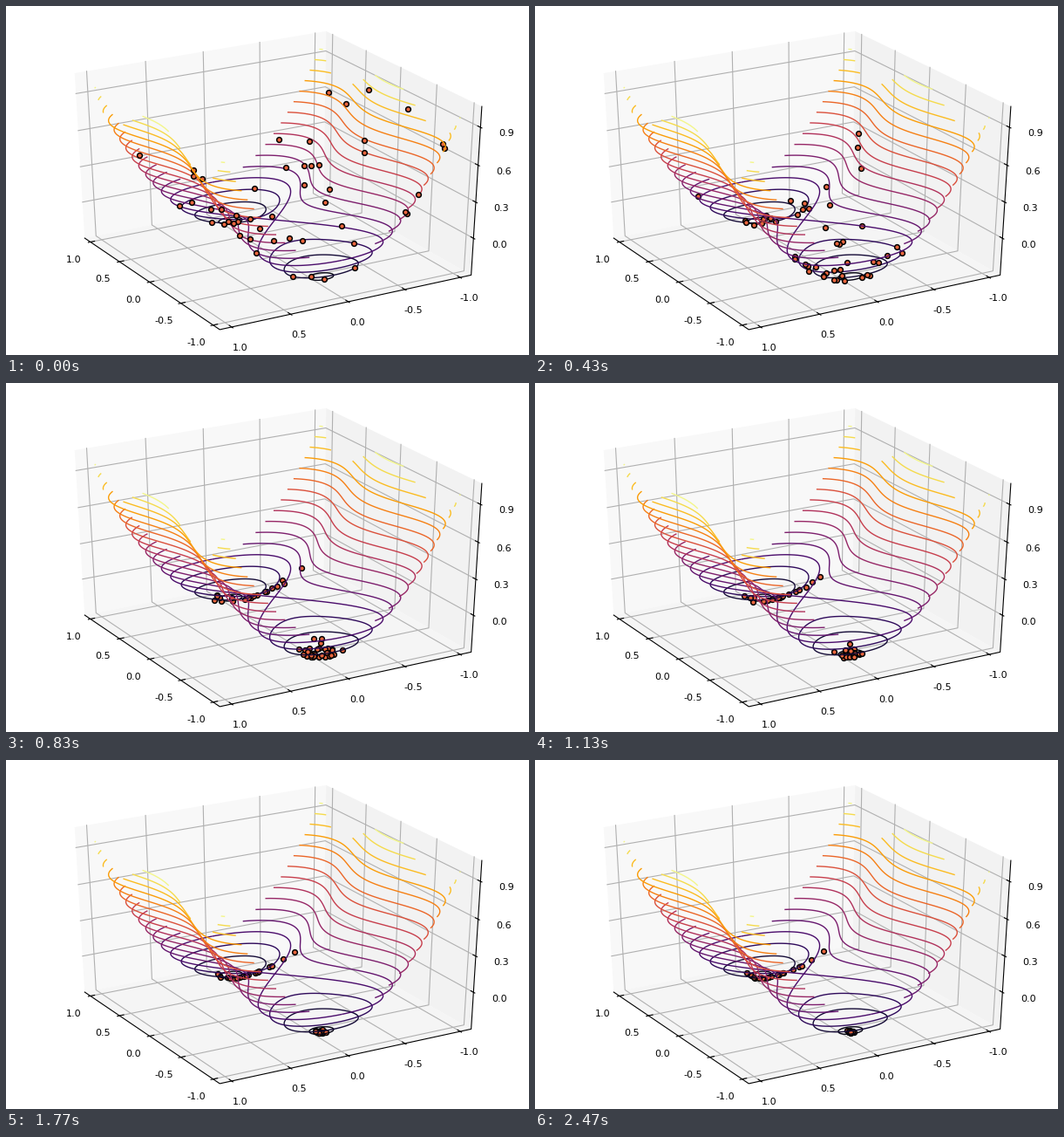
A matplotlib script for the animation above (2.51 s loop, 600x400 px).

```python
import numpy as np
import matplotlib.pyplot as plt
from matplotlib.animation import FuncAnimation
from matplotlib.collections import LineCollection

W, H = 600, 400
FRAMES, LOOP = 75, 2510
ELEV, AZIM, DIST = np.radians(30), np.radians(150), 10
LIM, ZLO, ZHI = 1.1, -0.3125, 1.0625
HALF = 25 / 48  # half the box edge in view units
TICKS = np.linspace(-1, 1, 5)
ZTICKS = np.arange(4) * 0.3
COUNT, STRAGGLERS = 50, 20


def surface(x, y):
    return x**4 - x**2 + y**2


def project(x, y, z):
    """Stage position and nearness to the camera."""
    x, y = np.asarray(x) / LIM * HALF, np.asarray(y) / LIM * HALF
    z = (2 * (np.asarray(z) - ZLO) / (ZHI - ZLO) - 1) * HALF
    side = -x * np.sin(AZIM) + y * np.cos(AZIM)
    ahead = x * np.cos(AZIM) + y * np.sin(AZIM)
    rise = z * np.cos(ELEV) - ahead * np.sin(ELEV)
    near = ahead * np.cos(ELEV) + z * np.sin(ELEV)
    depth = DIST - near
    return 308.4 + 3196 * side / depth, 193.8 - 2117 * rise / depth, near


fig = plt.figure(figsize=(W / 100, H / 100), dpi=100, facecolor="white")
ax = fig.add_axes([0, 0, 1, 1])
ax.axis("off")


def line(points, color, zorder):
    px, py, _ = project(*np.transpose(points))
    ax.plot(px, py, color=color, lw=0.8, zorder=zorder)


def tick(at, step, value, shift):
    at, step = np.array(at), np.array(step)
    line([at + step, at - 2 * step], "black", 4)
    px, py, _ = project(*at)
    ax.text(px + shift[0], py + shift[1], f"{value:.1f}", fontsize=8,
            color="black", family="DejaVu Sans", ha="center", va="center",
            zorder=5)


def draw_box():
    a, b = LIM, -LIM
    panes = [
        ("#f8f8f8", [(a, a, ZLO), (a, b, ZLO), (a, b, ZHI), (a, a, ZHI)]),
        ("#f2f2f2", [(a, b, ZLO), (b, b, ZLO), (b, b, ZHI), (a, b, ZHI)]),
        ("#f5f5f5", [(a, a, ZLO), (a, b, ZLO), (b, b, ZLO), (b, a, ZLO)]),
    ]
    for color, corners in panes:
        px, py, _ = project(*np.transpose(corners))
        ax.fill(px, py, color=color, lw=0, zorder=1)

    grid = "#b0b0b0"
    out = LIM / 60
    for v in TICKS:
        line([(v, a, ZLO), (v, b, ZLO), (v, b, ZHI)], grid, 2)
        line([(b, v, ZLO), (a, v, ZLO), (a, v, ZHI)], grid, 2)
        tick((v, a, ZLO), (0, out, 0), v, (-19.1, 20.4))
        tick((b, v, ZLO), (-out, 0, 0), v, (10, 23.7))
    for v in ZTICKS:
        line([(a, a, v), (a, b, v), (b, b, v)], grid, 2)
        tick((b, b, v), (-out, 0, 0), v, (29.5, 7.4))
    line([(a, a, ZLO), (b, a, ZLO), (b, b, ZLO), (b, b, ZHI)], "black", 3)


def draw_contours():
    x, y = np.meshgrid(*[np.linspace(-1, 1, 101)] * 2)
    levels = np.arange(-3, 13) * 0.08
    flat = ax.contour(x, y, surface(x, y), levels)
    all_segs = flat.allsegs
    flat.remove()
    cmap = plt.get_cmap("inferno")
    for level, segs in zip(levels, all_segs):
        shown, nearest = [], -1
        for seg in segs:
            px, py, near = project(seg[:, 0], seg[:, 1], level)
            shown.append(np.column_stack([px, py]))
            nearest = max(nearest, near.max())
        # nearer rings cover farther ones
        ax.add_collection(LineCollection(
            shown, colors=[cmap((level + 0.28) / 1.28)], linewidths=1.0,
            zorder=10 + nearest), autolim=False)


def swarm_path():
    """Noisy pull to the front well; the rest settle along a bent valley."""
    rng = np.random.default_rng(11)
    pos = rng.uniform(-1, 1, (COUNT, 2))
    goal = np.tile([-np.sqrt(0.5), 0.0], (COUNT, 1))
    left = np.argsort(pos[:, 0])[-STRAGGLERS:]
    left = left[np.argsort(-pos[left, 1])]
    s = np.linspace(0, 1, STRAGGLERS)**0.8
    goal[left] = np.column_stack([0.78 - 0.5 * s,
                                  0.08 - 0.15 * s - 0.26 * s**8])

    path = [pos]
    for n in range(1, FRAMES):
        pull = 0.15 * n / (n + 6)
        noise = 0.09 * np.exp(-n / 16) + 0.004
        pos = pos + pull * (goal - pos) + noise * rng.normal(size=pos.shape)
        pos = np.clip(pos, -1, 1)
        path.append(pos)
    return path


draw_box()
draw_contours()
path = swarm_path()
dots = ax.scatter(np.zeros(COUNT), np.zeros(COUNT), s=17,
                  facecolor="#e8663e", edgecolor="black", linewidth=1.1)
ax.set_xlim(0, W)
ax.set_ylim(H, 0)


def update(i):
    x, y = path[i].T
    px, py, near = project(x, y, surface(x, y))
    dots.set_offsets(np.column_stack([px, py]))
    dots.set_zorder(10 + near.max())
    return [dots]


anim = FuncAnimation(fig, update, frames=FRAMES, interval=LOOP / FRAMES,
                     repeat=True, repeat_delay=0, blit=False)
plt.show()
```
